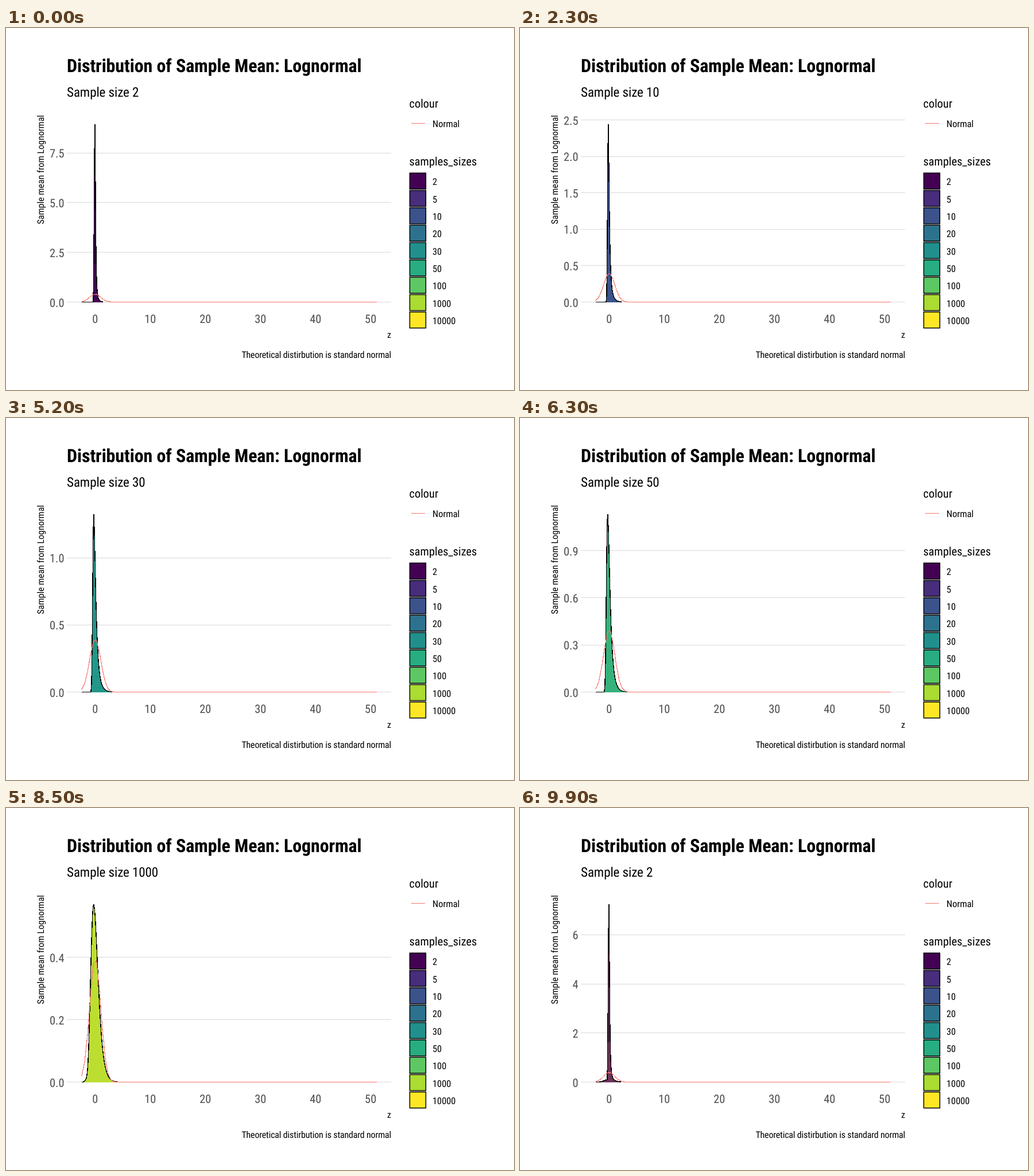
These frames come from a looping animation (885x632 px, 10 s). An HTML page:

```html
<!DOCTYPE html>
<html lang="en">
<head>
<meta charset="utf-8">
<title>Distribution of Sample Mean</title>
<style>
  html, body { margin: 0; width: 100%; height: 100%; overflow: hidden; background: #fff; }
  svg { display: block; width: 885px; height: 632px; }
  text {
    font-family: "Roboto Condensed", Roboto, sans-serif;
    font-stretch: 75%;
    font-size: 16px;
    text-rendering: geometricPrecision;
  }
  .title { font-size: 32px; font-weight: 700; letter-spacing: -.1px; }
  .subtitle { font-size: 23.1px; letter-spacing: -.1px; }
  .caption { letter-spacing: -.18px; }
  .head { font-size: 20.4px; }
  .key { font-size: 16.4px; }
  .tick { font-size: 20.4px; fill: #4d4d4d; }
  .mid { text-anchor: middle; }
  .end { text-anchor: end; }
  .grid, .normal, .outline, #area { shape-rendering: crispEdges; }
  .grid { stroke: #d9d9d9; stroke-width: 1; }
  .normal { fill: none; stroke: #f8766d; stroke-width: 1.2; }
  .outline { fill: none; stroke: #000; stroke-width: 1.4; stroke-linejoin: round; }
  .swatch { stroke: #000; stroke-width: 1.5; }
</style>
</head>
<body>
<svg viewBox="0 0 885 632">
  <text class="title" x="106" y="77">Distribution of Sample Mean: Lognormal</text>
  <text id="subtitle" class="subtitle" x="106" y="120"></text>
  <g id="yAxis"></g>
  <path id="area"/>
  <path id="outline" class="outline"/>
  <path id="normal" class="normal"/>
  <g id="xAxis"></g>
  <text class="end" x="671" y="541">z</text>
  <text class="caption end" x="671" y="575.5">Theoretical distirbution is standard normal</text>
  <text class="end" transform="translate(66 152) rotate(-90)">Sample mean from Lognormal</text>
  <text class="head" x="702.5" y="139">colour</text>
  <path class="normal" d="M705.5 166.5H729.5"/>
  <text class="key" x="743" y="173">Normal</text>
  <text class="head" x="702.5" y="240">samples_sizes</text>
  <g id="legend"></g>
</svg>
<script>
const $ = id => document.getElementById(id);

const LEFT = 106, RIGHT = 671, BASE = 478.5, HEIGHT = 310;
const X0 = 155.4, UNIT = 9.595;
const Z_MIN = -2.45, Z_MAX = 51.1;
const POINTS = 512;

// n: sample size, peak: density maximum, mode: z of the peak,
// width: full width at half height, s: skewness
const states = [
  { n: 2, color: '#440154', peak: 8.926, mode: -.12, width: .1, s: 1 },
  { n: 5, color: '#472d7b', peak: 4.26, mode: -.15, width: .15, s: .95 },
  { n: 10, color: '#3b528b', peak: 2.44, mode: -.23, width: .25, s: .87 },
  { n: 20, color: '#2c728e', peak: 1.65, mode: -.27, width: .46, s: .75 },
  { n: 30, color: '#21908c', peak: 1.36, mode: -.29, width: .58, s: .66 },
  { n: 50, color: '#27ad81', peak: 1.17, mode: -.3, width: .71, s: .58 },
  { n: 100, color: '#5dc863', peak: .97, mode: -.3, width: .89, s: .5 },
  { n: 1000, color: '#aadc32', peak: .594, mode: -.28, width: 1.5, s: .33 },
  { n: 10000, color: '#fde725', peak: .47, mode: -.23, width: 1.96, s: .2 }
];
const starts = [6, 18, 30, 41, 52, 63, 74, 85, 96];
const spans = [6, 6, 5, 5, 5, 5, 5, 5, 5];

const px = z => X0 + z * UNIT;
const zStep = (Z_MAX - Z_MIN) / (POINTS - 1);
const zAt = i => Z_MIN + i * zStep;

// Shifted lognormal, smoothed by a triangular kernel and scaled to its peak
function density({ peak, mode, width, s }) {
  const offset = width / (2 * Math.sinh(s * Math.sqrt(2 * Math.LN2)));
  const scale = offset * Math.exp(s * s);
  const shift = mode - offset;
  const pdf = z => {
    const u = z - shift;
    return u > 0 ? Math.exp(-((Math.log(u / scale) / s) ** 2) / 2) / u : 0;
  };
  const reach = 32;
  const raw = Array.from({ length: POINTS }, (_, i) => {
    let sum = 0;
    for (let k = -reach; k <= reach; k++) {
      sum += (reach - Math.abs(k)) * pdf(zAt(i) + 2 * k / reach * zStep);
    }
    return sum;
  });
  const top = Math.max(...raw);
  return raw.map(v => v * peak / top);
}
states.forEach(state => state.curve = density(state));

// Tick step: best balance of simple numbers, coverage and about five labels
function tickStep(max) {
  const lo = -.05 * max, hi = 1.05 * max, range = hi - lo;
  const nice = [1, 5, 2, 2.5, 4, 3];
  const power = Math.floor(Math.log10(max));
  let best = -Infinity, step = 1;
  for (let e = power - 1; e <= power + 1; e++) {
    nice.forEach((q, i) => {
      const size = q * 10 ** e;
      for (let k = 2; k <= 12; k++) {
        const last = (k - 1) * size;
        const cover = 1 - .5 * ((hi - last) ** 2 + lo ** 2) / (.1 * range) ** 2;
        const ratio = (Math.max(last, hi) - lo) / size / 4;
        const dense = 2 - Math.max(ratio, 1 / ratio);
        const score = .25 * (1 - i / 5) + .2 * cover + .5 * dense;
        if (score > best) { best = score; step = size; }
      }
    });
  }
  return step;
}

function yAxis(max) {
  const step = tickStep(max);
  let digits = 0;
  while (Math.abs(step * 10 ** digits - Math.round(step * 10 ** digits)) > 1e-6) digits++;
  let out = '';
  for (let i = 0; i * step <= 1.05 * max; i++) {
    const y = BASE - i * step / max * HEIGHT;
    out += `<path class="grid" d="M${LEFT} ${y}H${RIGHT}"/>` +
      `<text class="tick end" x="101.5" y="${y + 8}">${(i * step).toFixed(digits)}</text>`;
  }
  return out;
}

function line(values, z, max) {
  return 'M' + values.map((v, i) =>
    px(z(i)).toFixed(2) + ' ' + (BASE - v / max * HEIGHT).toFixed(2)).join('L');
}

const bellStep = (Z_MAX - Z_MIN) / 100;
const bellAt = i => Z_MIN + i * bellStep;
const bell = Array.from({ length: 101 }, (_, i) =>
  Math.exp(-(bellAt(i) ** 2) / 2) / Math.sqrt(2 * Math.PI));

function draw(tick) {
  let index = 0, mix = 0;
  starts.forEach((start, i) => {
    if (tick < start) return;
    const t = (tick - start + 1) / spans[i];
    index = t < 1 ? i : i + 1;
    mix = t < 1 ? t : 0;
  });
  const from = states[index], to = states[(index + 1) % states.length];
  const curve = from.curve.map((v, i) => v + (to.curve[i] - v) * mix);
  const max = Math.max(...curve);
  let end = POINTS - 1;
  while (curve[end] / max * HEIGHT < .4) end--;
  const path = line(curve.slice(0, end + 1), zAt, max);

  $('subtitle').textContent = 'Sample size ' + (mix > .5 ? to : from).n;
  $('yAxis').innerHTML = yAxis(max);
  $('outline').setAttribute('d', path);
  $('area').setAttribute('d', `${path}V${BASE}H${px(Z_MIN)}Z`);
  $('area').style.fill = `color-mix(in lab, ${from.color}, ${to.color} ${mix * 100}%)`;
  $('normal').setAttribute('d', line(bell, bellAt, max));
}

$('xAxis').innerHTML = [0, 10, 20, 30, 40, 50].map(v =>
  `<text class="tick mid" x="${px(v)}" y="515">${v}</text>`).join('');
$('legend').innerHTML = states.map(({ n, color }, i) => {
  const y = 253.2 + i * 30.32;
  return `<rect class="swatch" x="703.4" y="${y}" width="28" height="28" fill="${color}"/>` +
    `<text class="key" x="743" y="${y + 21.2}">${n}</text>`;
}).join('');

const began = performance.now();
let shown = -1;
function play() {
  const tick = Math.floor((performance.now() - began) / 100) % 100;
  if (tick !== shown) draw(shown = tick);
  requestAnimationFrame(play);
}
play();
</script>
</body>
</html>
```
